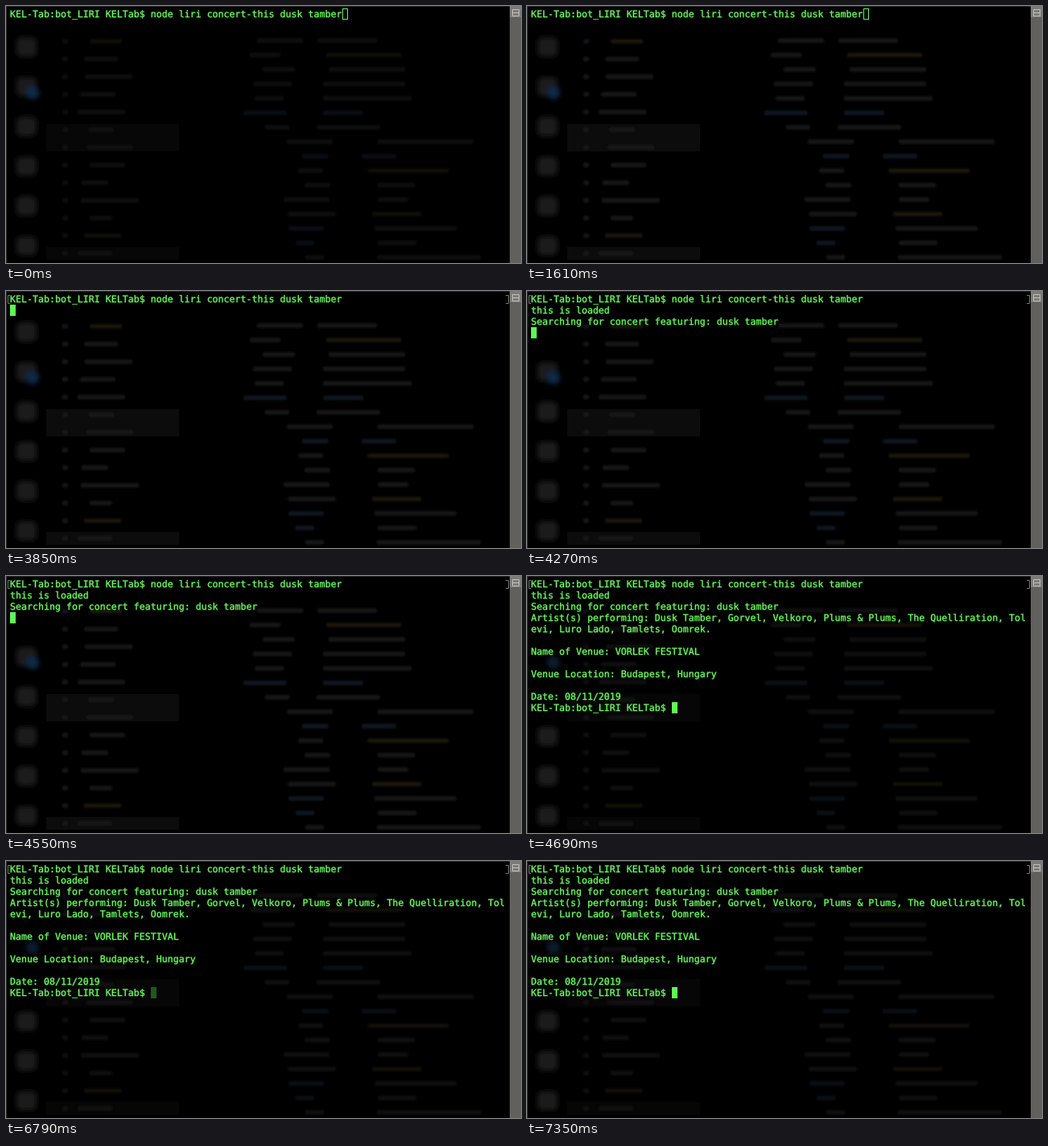
These frames come from a looping animation (640x320 px, 7420 ms). An HTML page:

```html
<!DOCTYPE html>
<html lang="en">
<head>
<meta charset="utf-8">
<title>Terminal</title>
<style>
html, body { margin: 0; width: 100%; height: 100%; overflow: hidden; background: #000; }
svg { position: absolute; left: 0; top: 0; }
pre {
  position: absolute; left: 5px; top: 3px; margin: 0;
  font: 11.627px/14px "DejaVu Sans Mono", monospace;
  color: #70fa64; text-rendering: geometricPrecision;
  -webkit-text-stroke: .25px #70fa64; text-shadow: 0 0 2px #1c5a18;
}
</style>
</head>
<body>
<svg width="640" height="320" viewBox="0 0 640 320">
  <defs>
    <filter id="soft" x="-50%" y="-50%" width="200%" height="200%"><feGaussianBlur stdDeviation="3"/></filter>
    <filter id="smudge" x="0" y="0" width="640" height="320" filterUnits="userSpaceOnUse"><feGaussianBlur stdDeviation="1.6"/></filter>
  </defs>
  <g id="icons" filter="url(#soft)"></g>
  <path id="panels" fill="#0c0c0c" d="M50 147H215V181H50ZM50 300H215V316H50Z"/>
  <g id="rows" filter="url(#smudge)" stroke-width="5"></g>
  <path d="M0 .5H626" stroke="#262626"/>
  <path d="M.5 0V320" stroke="#2a352a"/>
  <path id="marks" d="M5 5.5H2.5V15.5H5M621 5.5H624.5V15.5H621" fill="none" stroke="#717c70"/>
  <rect x="626" width="14" height="320" fill="#62605d"/>
  <rect x="626" width="14" height="14" fill="#7d7b78"/>
  <path d="M629.5 4.5H637.5V12.5H629.5ZM630 8.5H637" fill="none" stroke="#c2c0bc"/>
  <rect id="cursor" width="6" height="13" fill="#62f556" stroke="#62f556"/>
</svg>
<pre id="screen"></pre>
<script>
const LOOP = 7420, STEP = 70;
const FOCUS = 3220, ENTER = 3430, SEARCH = 4270, RESULT = 4690;
const prompt = "KEL-Tab:bot_LIRI KELTab$ ";
const command = prompt + "node liri concert-this dusk tamber";
const search = "this is loaded\nSearching for concert featuring: dusk tamber";
const result = `Artist(s) performing: Dusk Tamber, Gorvel, Velkoro, Plums & Plums, The Quelliration, Tol
evi, Luro Lado, Tamlets, Oomrek.

Name of Venue: VORLEK FESTIVAL

Venue Location: Budapest, Hungary

Date: 08/11/2019
${prompt}`;

const $ = id => document.getElementById(id);
const setAll = (node, attributes) => {
  for (const key in attributes) node.setAttribute(key, attributes[key]);
  return node;
};
const add = (parent, tag, attributes) =>
  parent.appendChild(setAll(document.createElementNS("http://www.w3.org/2000/svg", tag), attributes));

let seed = 7;
const random = (min, max) => {
  seed = seed * 16807 % 2147483647;
  return min + (max - min) * seed / 2147483647;
};

// Dim window contents showing through the translucent terminal
const icons = Array.from({ length: 6 }, (_, i) =>
  add($("icons"), "rect", { x: 13, y: 39 + 49.5 * i, width: 25, height: 24, rx: 6, fill: "#1c1c1c" }));
const badge = add($("icons"), "circle", { cx: 33, cy: 108, r: 8, fill: "#102c4a" });

function smudge(x, y, length) {
  const tint = random(0, 1);
  const stroke = tint < 0.15 ? "#0e1622" : tint < 0.25 ? "#1a140d" : "#121212";
  add($("rows"), "path", { d: `M${x} ${y}h${length}`, stroke });
}
for (let y = 44; y < 320; y += 22) {
  smudge(70, y, 7);
  smudge(random(88, 106), y, random(25, 75));
}
for (let y = 43; y < 320; y += 18) {
  const indent = y < 160 ? 292 : 345;
  smudge(indent + random(0, 30), y, random(22, 60));
  smudge(indent + random(90, 120), y, random(35, 130));
}

const ramp = (t, start, length) => Math.min(1, Math.max(0, (t - start + STEP) / length));

function cursorAlpha(t) {
  if (t >= 7350) return 1;
  if (t >= 6720) return 1 - ramp(t, 6720, 210);
  if (t >= 6300) return ramp(t, 6300, 280);
  return 1 - ramp(t, 5810, 210);
}

function draw(now) {
  const t = Math.floor(now % LOOP / STEP) * STEP;
  const lines = [command];
  if (t >= SEARCH) lines.push(search);
  if (t >= RESULT) lines.push(result);
  const text = lines.join("\n");
  if ($("screen").textContent !== text) $("screen").textContent = text;

  const row = t < ENTER ? 0 : text.split("\n").length - (t < RESULT ? 0 : 1);
  const column = t < ENTER ? command.length : t < RESULT ? 0 : prompt.length;
  setAll($("cursor"), {
    x: 5.5 + 7 * column, y: 3.5 + 14 * row,
    "fill-opacity": t < FOCUS ? 0 : 1, opacity: cursorAlpha(t)
  });

  const fade = (node, opacity) => node.setAttribute("opacity", opacity);
  const settled = 0.65 + 0.35 * ramp(t, 70, 280);
  fade($("marks"), t < ENTER ? 0 : 1);
  fade($("rows"), t < RESULT ? settled : 0.7);
  fade($("panels"), t < RESULT ? settled : 0.5);
  fade(badge, t < RESULT ? 1 : 0.6);
  // Icons fade where printed lines cover them
  icons.forEach((icon, i) => fade(icon, 50 * i + 40 < 14 * row ? 0.15 : 0.9));
}

function frame(now) {
  draw(now);
  requestAnimationFrame(frame);
}
draw(0);
requestAnimationFrame(frame);
</script>
</body>
</html>
```
